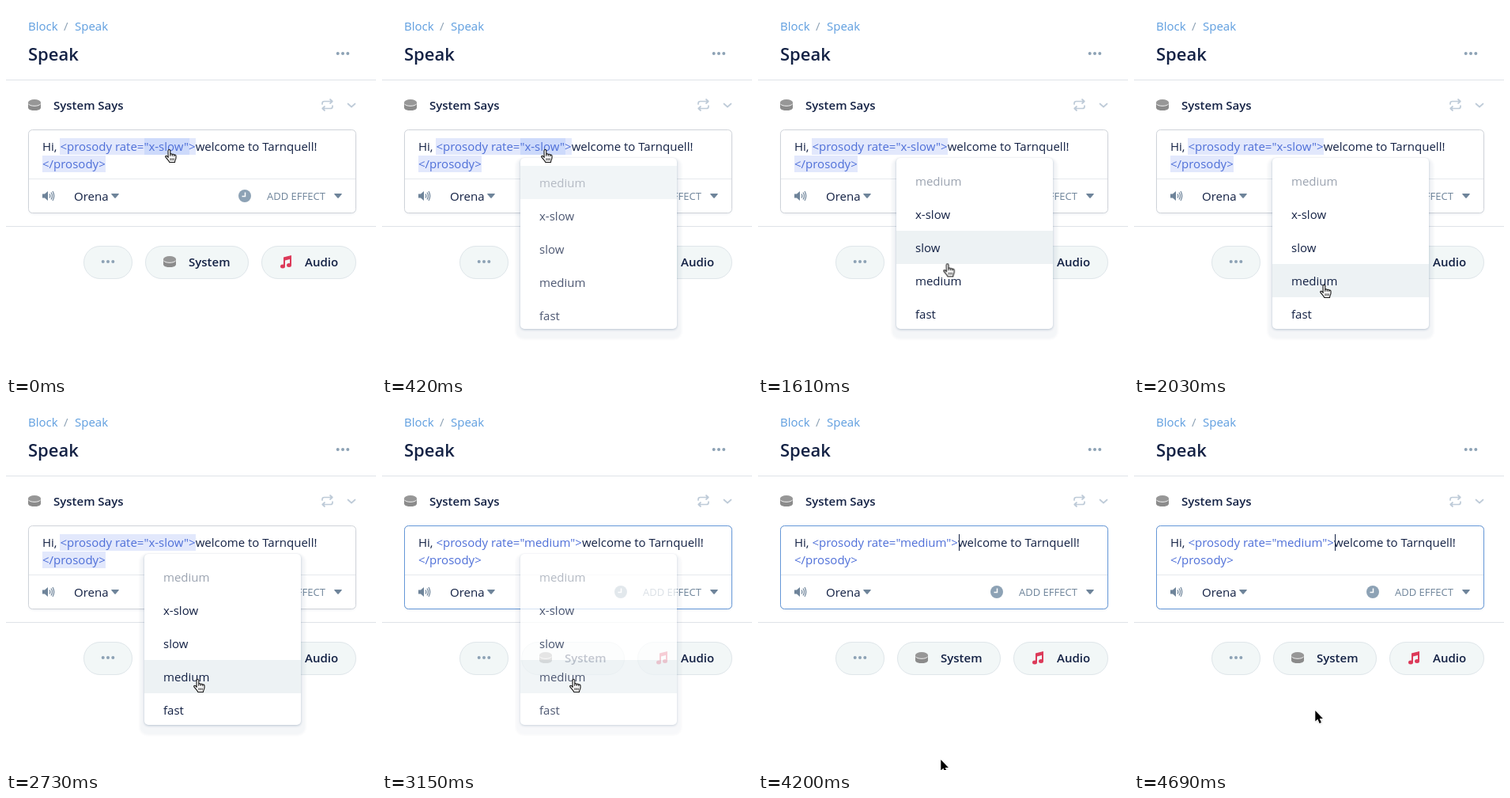
These frames come from a looping animation (468x465 px, 4760 ms). An HTML page:

```html
<!DOCTYPE html>
<html lang="en">
<head>
<meta charset="utf-8">
<title>Speak block</title>
<style>
html, body { margin: 0; width: 100%; height: 100%; overflow: hidden; background: #fff; }
svg { display: block; width: 468px; height: 465px; }
text { font: 400 15px "Open Sans", "Noto Sans", sans-serif; fill: #132144; white-space: pre; }
.semi { font-weight: 600; }
.title { font-size: 22px; font-weight: 600; }
.crumb { fill: #5d9ddf; }
.effect { font-size: 13px; font-weight: 500; fill: #6e849a; }
.tag { fill: #4e6fd8; }
.hint { fill: #9ba3b0; }
.rule { fill: #dfe3e8; }
.pill { fill: #f2f7f7; stroke: #dfe6ea; }
.dots { fill: #8da2b5; }
.faint { fill: none; stroke: #becbd8; stroke-width: 1.7; stroke-linecap: round; stroke-linejoin: round; }

/* One loop is 68 ticks of 70 ms */
.anim { animation: 4760ms step-end infinite; }
.before { animation-name: before; }
.after { animation-name: after; }
.token { animation-name: token; }
.caret { animation-name: caret; }
.menu { animation-name: menu; }
.list { animation-name: list; }
.band { animation-name: band; }
.cursor { animation-name: move; }
.hand { animation-name: hand; }
.arrow { animation-name: arrow; }

@keyframes before { 0% { opacity: 1 } 66.17%, 100% { opacity: 0 } }
@keyframes after { 0% { opacity: 0 } 66.17%, 100% { opacity: 1 } }
@keyframes token { 0% { opacity: 1 } 16.17%, 100% { opacity: 0 } }
@keyframes hand { 0% { opacity: 1 } 67.64%, 100% { opacity: 0 } }
@keyframes arrow { 0% { opacity: 0 } 67.64%, 100% { opacity: 1 } }
@keyframes caret {
  0% { opacity: 0 }
  67.64% { opacity: 1 }
  77.94% { opacity: 0 }
  88.23%, 100% { opacity: 1 }
}
@keyframes menu {
  0% { opacity: 0 }
  1.47% { opacity: 0; animation-timing-function: steps(4) }
  7.35% { opacity: 1 }
  64.7% { opacity: 1; animation-timing-function: steps(4) }
  70.58%, 100% { opacity: 0 }
}
@keyframes list {
  0% { opacity: 0; transform: translateY(8px) }
  4.41% { opacity: 0; transform: translateY(8px); animation-timing-function: steps(4) }
  10.29%, 100% { opacity: 1; transform: none }
}
@keyframes band {
  0% { transform: translateY(0) }
  22.05% { transform: translateY(42px) }
  27.94% { transform: translateY(84px) }
  35.29%, 100% { transform: translateY(126px) }
}
@keyframes move {
  0% { transform: translate(206px, 181px) }
  14.7% { transform: translate(206px, 181px); animation-timing-function: steps(7) }
  24.99% { transform: translate(238px, 284px) }
  26.47% { transform: translate(238px, 286px); animation-timing-function: steps(8) }
  38.23% { transform: translate(240px, 349px); animation-timing-function: steps(3) }
  42.64% { transform: translate(240px, 352px); animation-timing-function: steps(3) }
  47.05% { transform: translate(240px, 351px) }
  48.52% { transform: translate(240px, 351px); animation-timing-function: steps(6) }
  57.35% { transform: translate(242px, 350px) }
  77.94% { transform: translate(242px, 350px); animation-timing-function: steps(7) }
  88.23% { transform: translate(231px, 452px) }
  89.7% { transform: translate(230px, 441px) }
  91.17% { transform: translate(230px, 441px); animation-timing-function: steps(3) }
  95.58% { transform: translate(233px, 412px); animation-timing-function: steps(2) }
  98.52%, 100% { transform: translate(229px, 390px) }
}
</style>
</head>
<body>
<svg viewBox="0 0 468 465" xmlns="http://www.w3.org/2000/svg">
  <defs>
    <g id="disc">
      <path d="M0 4V10.4C0 15.2 16 15.2 16 10.4V4Z" fill="#8b8b8b"/>
      <ellipse cx="8" cy="4" rx="8" ry="4" fill="#979797"/>
      <path d="M.3 5.6C2 9.2 14 9.2 15.7 5.6" fill="none" stroke="#fff" stroke-width=".9"/>
    </g>
    <g id="dots" class="dots">
      <circle cx="-6.3" r="2"/><circle r="2"/><circle cx="6.3" r="2"/>
    </g>
    <path id="drop" d="M.8 0H9.2Q10.4 0 9.6 1L5.7 5.6Q5 6.3 4.3 5.6L.4 1Q-.4 0 .8 0Z" fill="#6e849a"/>
    <filter id="soft" x="-20%" y="-20%" width="140%" height="140%"><feGaussianBlur stdDeviation="1.5"/></filter>
  </defs>

  <!-- Header -->
  <text class="crumb" x="28" y="31">Block</text>
  <text x="73" y="31" fill="#8da2b5" style="fill:#8da2b5">/</text>
  <text class="crumb" x="87" y="31">Speak</text>
  <text class="title" x="28" y="69">Speak</text>
  <use href="#dots" x="426" y="60"/>
  <rect class="rule" y="93" width="468" height="1"/>

  <!-- Section title -->
  <use href="#disc" x="28" y="118"/>
  <text class="semi" x="60" y="131">System Says</text>
  <g class="faint">
    <path d="M400 124V123Q400 120.5 402.500 120.500H412.500M410 118L412.800 120.500L410 123M413 126V127Q413 129.500 410.500 129.500H400.500M403 127L400.200 129.500L403 132"/>
    <path d="M432.500 123.500L437 127.500L441.500 123.500"/>
  </g>

  <!-- Speech card -->
  <rect x="29" y="158" width="413" height="105" rx="5" fill="#113160" opacity=".08" filter="url(#soft)"/>
  <rect x="28.500" y="156.500" width="414" height="105" rx="5" fill="#fff" stroke="#cfd3d9"/>
  <rect class="anim after" x="28.500" y="156.500" width="414" height="105" rx="5" fill="none" stroke="#6598d8"/>
  <rect x="29" y="218" width="413" height="1" fill="#e6e9ed"/>

  <g class="anim before">
    <path d="M68 167H240V188H68ZM46 189H126V210H46Z" fill="#e2e8fc"/>
    <rect class="anim token" x="175" y="167" width="57" height="21" fill="#cddafb"/>
    <text x="46" y="183">Hi, <tspan class="tag">&lt;prosody rate="x-slow"&gt;</tspan>welcome to Tarnquell!</text>
  </g>
  <g class="anim after">
    <text x="46" y="183">Hi, <tspan class="tag">&lt;prosody rate="medium"&gt;</tspan>welcome to Tarnquell!</text>
  </g>
  <text class="tag" x="46" y="205">&lt;/prosody&gt;</text>
  <rect class="anim caret" x="254" y="167" width="1" height="21" fill="#132144"/>

  <path d="M46 237.500H49L53 234V246L49 242.500H46Z" fill="#6e849a"/>
  <path d="M55 237.500Q56.800 240 55 242.500M57 235.500Q60 240 57 244.500M59 234Q62.500 240 59 246" fill="none" stroke="#6e849a" stroke-width="1.200"/>
  <text x="86" y="246">Orena</text>
  <use href="#drop" x="133" y="237"/>
  <circle cx="302" cy="240" r="8" fill="#8da2b5"/>
  <path d="M302.500 235.500V240.500H298.500" fill="none" stroke="#fff" stroke-width="1.500"/>
  <text class="effect" x="330" y="245">ADD EFFECT</text>
  <use href="#drop" x="415" y="237"/>
  <rect class="rule" y="278" width="468" height="1"/>

  <!-- Buttons -->
  <rect class="pill" x="98.500" y="303.500" width="61" height="41" rx="20.500"/>
  <rect class="pill" x="176.500" y="303.500" width="130" height="41" rx="20.500"/>
  <rect class="pill" x="323.500" y="303.500" width="119" height="41" rx="20.500"/>
  <use href="#dots" x="129" y="323"/>
  <use href="#disc" x="199" y="316"/>
  <text class="semi" x="231" y="329">System</text>
  <g fill="#dc3a59">
    <path d="M351 317.500L361 315V327.500H359V320L353 321.500V329H351Z"/>
    <ellipse cx="350" cy="329" rx="3" ry="2.500"/>
    <ellipse cx="358" cy="327.500" rx="3" ry="2.500"/>
  </g>
  <text class="semi" x="378" y="329">Audio</text>

  <!-- Rate menu -->
  <g class="anim menu">
    <rect x="169" y="192" width="210" height="229" rx="10" fill="#113160" opacity=".045" filter="url(#soft)"/>
    <rect x="175" y="193" width="198" height="216" rx="5" fill="#113160" opacity=".26" filter="url(#soft)"/>
    <rect x="175" y="192" width="198" height="216" rx="5" fill="#fff"/>
    <g class="anim list">
      <rect class="anim band" x="175" y="200" width="198" height="42" fill="#edf2f4"/>
      <text class="hint" x="199" y="227">medium</text>
      <text x="199" y="269">x-slow</text>
      <text x="199" y="311">slow</text>
      <text x="199" y="353">medium</text>
      <text x="199" y="395">fast</text>
    </g>
  </g>

  <!-- Pointer -->
  <g class="anim cursor">
    <g class="anim hand">
      <g transform="translate(-5 0)" fill="#fff" stroke="#111" stroke-width="1.100" stroke-linejoin="round">
        <path d="M4 1.900a1.400 1.400 0 0 1 2.800 0V6.600C6.900 5.500 9.200 5.500 9.300 6.900C9.600 6 11.600 6.100 11.700 7.400C12.100 6.700 14 7 14 8.400V10.800C14 13 12.600 13.800 12.500 16.500H5.700C5.300 14.500 2.600 12.600 .9 9.900C.2 8.600 1.700 7.700 2.700 8.700L4.200 10.300Z"/>
        <path d="M6.800 6.600V9M9.300 6.900V9M11.700 7.400V9.300M7 11.300V14.300M9.100 11.300V14.300M11.200 11.300V14.300" fill="none" stroke-width=".9"/>
      </g>
    </g>
    <g class="anim arrow">
      <path d="M.3 0V13.600L3.400 10.800L5.600 15.900L7.900 14.900L5.700 9.900H9.900Z" fill="#000" opacity=".25" transform="translate(.5 1)" filter="url(#soft)"/>
      <path d="M.3 0V13.600L3.400 10.800L5.600 15.900L7.900 14.900L5.700 9.900H9.900Z" fill="#000" stroke="#fff" stroke-width="1.200" paint-order="stroke"/>
    </g>
  </g>
</svg>
</body>
</html>
```
